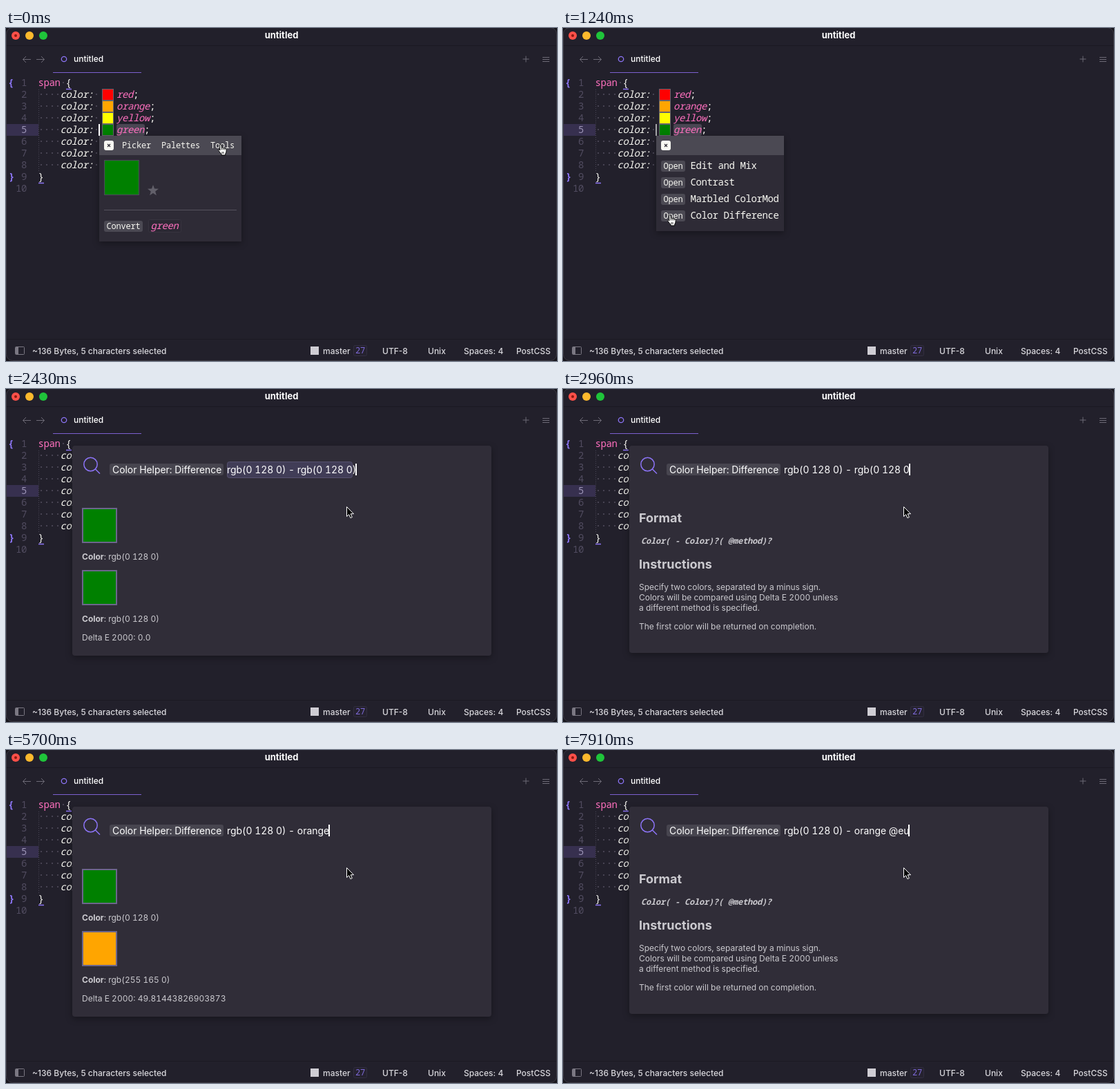
An HTML page for the animation above (7990 ms loop, 798 px wide and 482 px high).

```html
<!DOCTYPE html>
<html lang="en">
<head>
<meta charset="utf-8">
<title>untitled</title>
<style>
  html, body { margin: 0; width: 100%; height: 100%; overflow: hidden; background: #16141b; }
  svg { display: block; width: 798px; height: 482px; }
  text { white-space: pre; font: 12px Inter, sans-serif; fill: #d9d8dd; }
  .bold { font-weight: 700; }
  .white { fill: #fff; }
  .ui text { font-weight: 500; }
  .code, .num, .brace { font: 500 14px "Noto Sans Mono", monospace; letter-spacing: -.4px; fill: #f8f8f2; }
  .num { font-weight: 400; fill: #514c60; text-anchor: end; }
  .num.on { fill: #9a92b4; }
  .brace { fill: #8f78fb; font-weight: 700; }
  .italic { font-style: italic; }
  .pink { fill: #ff70bf; }
  .small { font: 500 12px "Noto Sans Mono", monospace; letter-spacing: -.2px; fill: #f8f8f2; }
  .badge { font-weight: 700; fill: #7c68d6; }
  .method { font-weight: 700; font-style: italic; fill: #cfced3; }
  .input { font-size: 13.9px; fill: #fff; font-variant-numeric: tabular-nums; }
  .info text { fill: #cbcacf; font-variant-numeric: tabular-nums; }
  .info .head { font-size: 18px; font-weight: 700; }
  .purple { stroke: #8c74f6; fill: none; }
  .icon { stroke: #6d6a76; fill: none; }
  .body { fill: #2e2b36; }
  .bar { fill: #4b4953; }
  .shade { filter: drop-shadow(0 3px 5px #0005); }
</style>
</head>
<body>
<svg viewBox="0 0 798 482">
  <defs>
    <g id="close">
      <rect x="142" y="163" width="14" height="14" rx="3" fill="#f8f8f2"/>
      <path d="M147 168l4 4m0-4l-4 4" stroke="#2e2b36" stroke-width="1.2"/>
    </g>
  </defs>

  <!-- window -->
  <rect x=".5" y="-.5" width="797" height="482" rx="9" fill="#22202b" stroke="#3a3842"/>
  <path d="M1 25.5H797M1 450.5H797" stroke="#1b1922"/>
  <circle cx="14" cy="11" r="6" fill="#fe5049"/>
  <circle cx="14" cy="11" r="2" fill="#8c1a10"/>
  <circle cx="34" cy="11" r="6" fill="#fdb92d"/>
  <circle cx="54" cy="11" r="6" fill="#1fc43a"/>
  <text class="white bold" x="399" y="15" style="font-size:13px" text-anchor="middle">untitled</text>

  <!-- tab bar -->
  <path class="icon" d="M36 45.5H24.5m4.500-4.500l-4.500 4.500 4.500 4.500M44 45.500h11.500m-4.500-4.500l4.500 4.500-4.500 4.500M748.500 45h9m-4.500-4.500v9M777 42.500h10m-10 3h10m-10 3h10"/>
  <circle class="purple" cx="84" cy="45" r="3.7" stroke-width="1.3"/>
  <g class="ui"><text class="white" x="98" y="49">untitled</text></g>
  <path d="M68 64.5H196" stroke="#7c60cf"/>

  <!-- editor -->
  <rect x="1" y="139" width="46" height="17" fill="#37304f"/>
  <path d="M47.5 89V207" stroke="#4a4656" stroke-dasharray="1 2"/>
  <g id="rows"></g>
  <path class="purple" d="M87 88.5h8M47 224.5h8" stroke-width="1.5"/>
  <rect id="editCaret" x="134" y="139" width="2" height="17" fill="#fff"/>

  <!-- status bar -->
  <g class="ui">
    <rect x="13.5" y="461.5" width="13" height="11" rx="1" fill="none" stroke="#7b7883"/>
    <rect x="14" y="462" width="4" height="10" fill="#7b7883"/>
    <text x="38" y="472">~136 Bytes, 5 characters selected</text>
    <rect x="441" y="461" width="12" height="12" fill="#cfcdd4"/>
    <text x="459" y="472">master</text>
    <rect x="503.5" y="459.5" width="19" height="15" rx="2" fill="#25222f" stroke="#322e40"/>
    <text class="small badge" x="506" y="471">27</text>
    <text x="545" y="472">UTF-8</text>
    <text x="611" y="472">Unix</text>
    <text x="663" y="472">Spaces: 4</text>
    <text x="739" y="472">PostCSS</text>
  </g>

  <!-- colour popup -->
  <g id="picker">
    <rect class="body shade" x="135" y="156" width="206" height="153"/>
    <rect class="bar" x="135" y="156" width="206" height="28"/>
    <use href="#close"/>
    <text class="small" x="168" y="174">Picker</text>
    <text class="small" x="225" y="174">Palettes</text>
    <text class="small" x="296" y="174">Tools</text>
    <rect x="142.5" y="191.5" width="50" height="50" fill="#008000" stroke="#4d4a5c"/>
    <path d="M213 227l2 5.600 6 .2-4.800 3.700 1.700 5.800-4.900-3.400-4.900 3.400 1.700-5.800-4.800-3.700 6-.2z" fill="#62606a"/>
    <path d="M142 263.5H334" stroke="#55525e"/>
    <rect class="bar" x="142" y="279" width="56" height="16" rx="3"/>
    <text class="small" x="145.5" y="291">Convert</text>
    <rect x="206.5" y="277.5" width="47" height="18" rx="2" fill="#2b2833" stroke="#37343f"/>
    <text class="code italic pink" x="209.5" y="291">green</text>
  </g>

  <!-- tools popup -->
  <g id="tools">
    <rect class="body shade" x="135" y="156" width="185" height="138"/>
    <rect class="bar" x="135" y="156" width="185" height="28"/>
    <use href="#close"/>
    <g id="toolRows"></g>
  </g>

  <!-- input dialog -->
  <g id="dialog">
    <rect id="panel" class="shade" x="96" y="82" width="607" height="304" rx="4" fill="#302d38"/>
    <circle class="purple" cx="122.5" cy="109" r="9.7" stroke-width="1.5"/>
    <path class="purple" d="M129.5 116L136 122.5" stroke-width="1.5"/>
    <rect x="150" y="108" width="165" height="17" rx="3" fill="#47454f"/>
    <text class="input" x="154" y="122">Color Helper: Difference</text>
    <rect id="selection" x="320.5" y="105.5" width="181" height="23" rx="3" fill="#413d57" stroke="#575270"/>
    <text class="input" id="typed" x="320" y="122"></text>
    <rect id="caret" y="108" width="2" height="17" fill="#fff"/>

    <g id="results" class="info">
      <rect x="111" y="173" width="49" height="49" fill="#008000" stroke="#6c668c" stroke-width="2"/>
      <text x="110" y="247"><tspan class="bold">Color</tspan>: rgb(0 128 0)</text>
      <rect id="second" x="111" y="263" width="49" height="49" stroke="#6c668c" stroke-width="2"/>
      <text x="110" y="337"><tspan class="bold">Color</tspan>: <tspan id="rgb"></tspan></text>
      <text x="110" y="364">Delta E 2000: <tspan id="delta"></tspan></text>
    </g>

    <g id="help" class="info">
      <text class="head" x="110" y="193">Format</text>
      <text class="small method" x="113" y="224">Color( - Color)?( @method)?</text>
      <text class="head" x="110" y="260">Instructions</text>
      <text x="110" y="291">Specify two colors, separated by a minus sign.</text>
      <text x="110" y="306">Colors will be compared using Delta E 2000 unless</text>
      <text x="110" y="321">a different method is specified.</text>
      <text x="110" y="348">The first color will be returned on completion.</text>
    </g>
  </g>

  <!-- pointers -->
  <g id="hand" fill="#fff" stroke="#000">
    <path d="M3 9L2.6 1.8C2.6.2 4.8.2 5 1.8L5.4 5.600C6 4.600 7.400 4.900 7.600 6 8.400 5.200 9.800 5.600 9.900 6.700 11 6.200 12.200 6.900 12.200 8.200 12.200 11 11.600 12.400 10.800 14V16H5V14.600C3.400 13 2.200 11.200.9 9.400.2 8.200 1.800 7.200 3 9z"/>
    <path d="M5.4 5.500v3M7.700 6v2.500M9.900 6.700v2M6 11v3M8 11v3" stroke-width=".8"/>
  </g>
  <path id="arrow" fill="#000" stroke="#fff" d="M.5.5V14.5L3.7 11.6 5.9 16.6 8.3 15.6 6.2 10.7H10.5z"/>
</svg>

<script>
const LOOP = 7990;
const $ = id => document.getElementById(id);
const show = (id, on) => $(id).style.display = on ? '' : 'none';

// Code rows
const colors = ['red', 'orange', 'yellow', 'green'];
const dot = (x, y) => `<circle cx="${x}" cy="${y}" r=".9" fill="#5a5566"/>`;

function codeRow(i) {
  const mid = 79 + 17 * i, base = mid + 5;
  let out = `<text class="num${i === 4 ? ' on' : ''}" x="30" y="${base}">${i + 1}</text>`;
  if (i < 1 || i > 7) return out;
  for (const x of [51, 59, 67, 75, 131]) out += dot(x, mid);
  out += `<text class="code italic" x="78.5" y="${base}">color:</text>`;
  const name = colors[i - 1];
  if (!name) return out;
  if (i === 4) out += `<rect x="160" y="${mid - 8}" width="41" height="17" rx="3" fill="#4a4653"/>`;
  return out +
    `<rect x="139.5" y="${mid - 7.5}" width="16" height="16" fill="${name}" stroke="#66636e"/>` +
    `<text class="code" x="160" y="${base}"><tspan class="italic pink">${name}</tspan>;</text>`;
}

$('rows').innerHTML = Array.from({ length: 10 }, (_, i) => codeRow(i)).join('') +
  dot(83, 79) +
  '<text class="code pink" x="46.5" y="84">span</text><text class="code" x="86.5" y="84">{</text>' +
  '<text class="code" x="46.5" y="220">}</text>' +
  '<text class="brace" x="3" y="84">{</text><text class="brace" x="4" y="220">}</text>';

$('toolRows').innerHTML = ['Edit and Mix', 'Contrast', 'Marbled ColorMod', 'Color Difference']
  .map((label, i) => {
    const y = 192 + 24 * i;
    return `<rect class="bar" x="142" y="${y}" width="35" height="16" rx="3"/>` +
      `<text class="small" x="145.5" y="${y + 12}">Open</text>` +
      `<text class="code" x="184.5" y="${y + 12}">${label}</text>`;
  }).join('');

// Times in ms
const OPEN_TOOLS = 180, OPEN_DIALOG = 1330, DESELECT = 2610, RETYPE = 5070;
const firstTail = 'rgb(0 128 0)', nextTail = 'orange @eu';
const deletes = [2960, ...Array.from({ length: 8 }, (_, i) => 3310 + 87.5 * i), 4190, 4370, 4550];
const keys = [RETYPE, 5250, 5340, 5430, 5520, 5700, 6330, 6850, 7290, 7550];
const editBlink = [[0, 1], [270, .5], [360, 0], [700, .5], [790, 1], [1150, .8], [1240, .6]];
const inputBlink = [[0, 1], [2200, .5], [2290, 0], [2350, .5], [2430, 1], [4900, 0], [5070, 1],
  [6060, .5], [6150, 0], [6240, .5], [6330, 1], [6410, .6], [6670, 1], [7550, .5], [7910, 1]];

const passed = (times, t) => times.filter(x => x <= t).length;
const at = (track, t) => track.findLast(([x]) => x <= t)[1];
const mix = (a, b, p) => a + (b - a) * p;

// Progress in n equal jumps, the first at start and the last at end
function jumps(t, start, end, n) {
  if (t < start) return 0;
  return Math.min(1, (Math.floor((t - start) * (n - 1) / (end - start) + 1e-6) + 1) / n);
}

function pointer(t) {
  const a = jumps(t, 270, 970, 9), b = jumps(t, 1780, 2030, 4);
  const out = 1 - (1 - a) ** 3, glide = b * b * (3 - 2 * b);
  const isHand = t < 270 || (t >= 880 && t < OPEN_DIALOG);
  const x = t < OPEN_DIALOG ? mix(307, 151, out) : mix(154, 493, glide);
  const y = t < OPEN_DIALOG ? mix(168, 270, out) : mix(270, 170, glide);
  show('hand', isHand);
  show('arrow', !isHand);
  $(isHand ? 'hand' : 'arrow').setAttribute('transform', `translate(${x} ${y})`);
}

function input(t) {
  const tail = t < RETYPE
    ? firstTail.slice(0, firstTail.length - passed(deletes, t))
    : nextTail.slice(0, passed(keys, t));
  const typed = $('typed');
  typed.textContent = 'rgb(0 128 0) - ' + tail;
  const end = 320 + typed.getComputedTextLength();
  $('caret').setAttribute('x', Math.round(end) - 1);
  $('caret').style.opacity = at(inputBlink, t);
  show('selection', t < DESELECT);
}

function results(t) {
  const orange = t >= RETYPE;
  const valid = t < deletes[0] || (t >= keys[5] && t < keys[7]);
  show('results', valid);
  show('help', !valid);
  $('panel').setAttribute('height', valid ? 304 : 300);
  $('second').setAttribute('fill', orange ? '#ffa500' : '#008000');
  $('rgb').textContent = orange ? 'rgb(255 165 0)' : 'rgb(0 128 0)';
  $('delta').textContent = orange ? '49.81443826903873' : '0.0';
}

const began = performance.now();
function draw() {
  const t = (performance.now() - began) % LOOP;
  show('picker', t < OPEN_TOOLS);
  show('tools', t >= OPEN_TOOLS && t < OPEN_DIALOG);
  show('dialog', t >= OPEN_DIALOG);
  $('editCaret').style.opacity = at(editBlink, t);
  pointer(t);
  input(t);
  results(t);
  requestAnimationFrame(draw);
}
draw();
</script>
</body>
</html>
```
